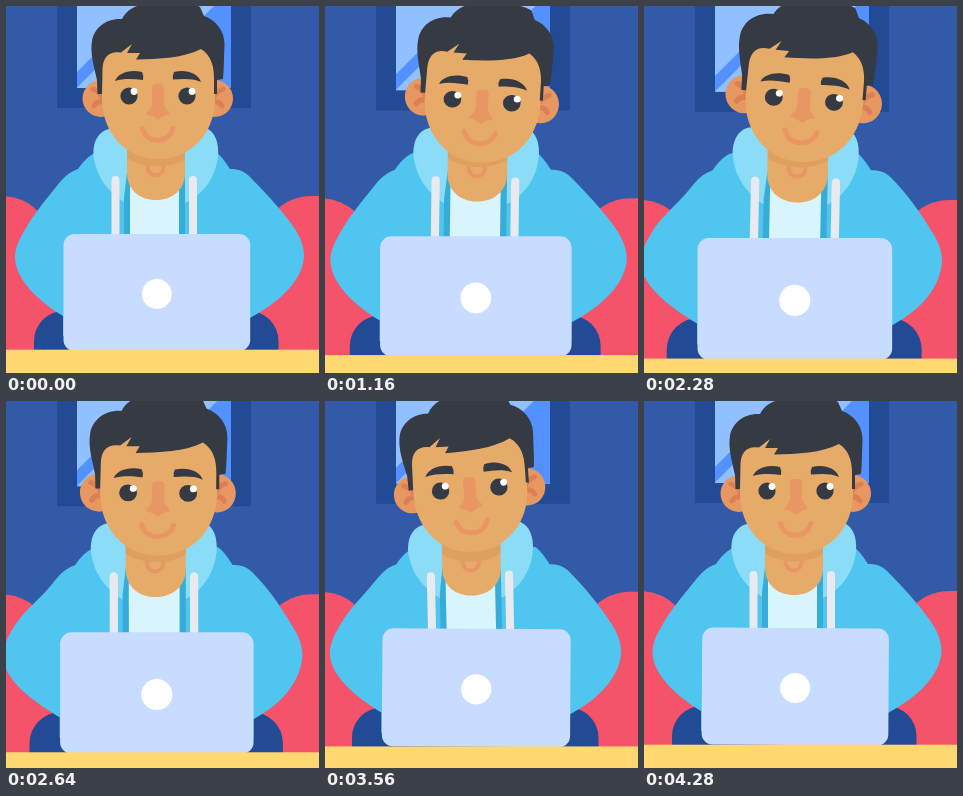
An HTML page with a canvas that plays this animation: 313x367 px, repeating every 4.32 s.

```html
<!DOCTYPE html>
<html lang="en">
<head>
<meta charset="utf-8">
<title>At the laptop</title>
<style>
html, body { margin: 0; width: 100%; height: 100%; overflow: hidden; background: #325aa8; }
canvas { display: block; width: 313px; height: 367px; }
</style>
</head>
<body>
<canvas id="stage"></canvas>
<script>
const W = 313, H = 367, LOOP = 4320, ZOOM = 4160;
const canvas = document.getElementById('stage');
const ctx = canvas.getContext('2d');
const ratio = window.devicePixelRatio || 1;
canvas.width = Math.round(W * ratio);
canvas.height = Math.round(H * ratio);

const C = {
  wall: '#325aa8', navy: '#234a94', glass: '#90c0ff', glassBlue: '#5291ff',
  couch: '#f45369', hoodie: '#4fc5ef', hood: '#8bdcf7', fold: '#35add8',
  shirt: '#d8f4fc', cord: '#e8eaf0', skin: '#e7ab69', shade: '#df9f60',
  ear: '#e79862', earIn: '#dd7f54', blush: '#e99665', hair: '#363a42',
  laptop: '#c7dcff', table: '#ffd871'
};

// Poses over time; every row of values shares these moments.
const times = [0, 520, 1160, 2280, 3000, 3560, 4280, 4320];
const pose = {
  headX: [152, 152.3, 157.2, 160, 144.3, 144.8, 152, 152],
  headY: [92, 93.5, 94, 92.5, 90.3, 89.3, 92, 92],
  tilt: [0, 1.4, 3.8, 4.8, -3.9, -3.9, 0, 0],
  nod: [0, 2.7, 3, 3, 2, 0.7, 0, 0],
  lean: [0, 0, 0.8, 1.2, -1.35, -1.2, 0, 0],
  elbow: [0, -4.8, 0, -6, -7.3, -3, -0.5, 0]
};

const rad = deg => deg * Math.PI / 180;
const ease = k => (1 - Math.cos(Math.PI * k)) / 2;
const ramp = (t, a, b) => ease(Math.min(1, Math.max(0, (t - a) / (b - a))));
const blink = t => ramp(t, 2840, 2940) * (1 - ramp(t, 2940, 3040));

function at(name, t) {
  const v = pose[name];
  let i = 0;
  while (i < times.length - 2 && t >= times[i + 1]) i++;
  return v[i] + (v[i + 1] - v[i]) * ramp(t, times[i], times[i + 1]);
}

function group(draw) {
  ctx.save();
  draw();
  ctx.restore();
}

function rect(x, y, w, h, color) {
  ctx.fillStyle = color;
  ctx.fillRect(x, y, w, h);
}

function round(x, y, w, h, r, color) {
  ctx.beginPath();
  ctx.roundRect(x, y, w, h, r);
  ctx.fillStyle = color;
  ctx.fill();
}

function oval(x, y, rx, ry, color) {
  ctx.beginPath();
  ctx.ellipse(x, y, rx, ry, 0, 0, 7);
  ctx.fillStyle = color;
  ctx.fill();
}

function shape(d, color) {
  ctx.fillStyle = color;
  ctx.fill(new Path2D(d));
}

function line(d, color, width) {
  ctx.strokeStyle = color;
  ctx.lineWidth = width;
  ctx.lineCap = ctx.lineJoin = 'round';
  ctx.stroke(new Path2D(d));
}

function turn(x, y, deg) {
  ctx.translate(x, y);
  ctx.rotate(rad(deg));
  ctx.translate(-x, -y);
}

function zoomAt(x, y, sx, sy) {
  ctx.translate(x, y);
  ctx.scale(sx, sy);
  ctx.translate(-x, -y);
}

function room() {
  rect(51, -20, 194, 122, C.navy);
  rect(71, -20, 154, 102, C.glass);
  group(() => {
    ctx.beginPath();
    ctx.rect(71, -20, 154, 102);
    ctx.clip();
    shape('M157 -20 H172.500 L70.500 82 H55 Z', C.glassBlue);
    shape('M228 -20 L126 82 H340 V-20 Z', C.glassBlue);
  });
  round(-60, 190, 106, 220, 50, C.couch);
  round(255, 190, 120, 220, 50, C.couch);
  rect(30, 250, 250, 150, C.couch);
}

function body(e) {
  shape(`M89 147 C82 150 76 157 72 163 C62 167 58 171 50 181
    C38 196 ${28 + e} 208 ${20 + e} 222 C${12 + e} 235 ${9 + e} 243 ${9 + e} 252
    C${10 + e} 275 34 296 57 310 V330 H244 V312
    C272 297 ${297 + e} 275 ${298 + e} 250 C${298 + e} 240 ${294 + e} 230 ${287 + e} 220
    C${274 + e * 0.6} 202 257 184 243 170 C237 164 231 163 224 163
    C219 155 215 150 210 146 Z`, C.hoodie);
}

function chest(zoom) {
  group(() => {
    zoomAt(84, 136, 1 - 0.03 * zoom, 1);
    shape(`M103 123 C90 126 86 140 88 153 C91 171 101 185 118 196 L124 198 V150 H176 V198
      L181 196 C199 187 210 170 212 150 C213 136 209 126 200 122 Z`, C.hood);
  });
  shape('M121 166 L118 192 V260 H179 V166 Z', C.fold);
  rect(124, 172, 49, 88, C.shirt);
  shape('M121 130 V167 C121 184 134 194 150 194 C166 194 179 184 179 167 V130 Z', C.skin);
  shape('M121 140 H179 V153 C164 163 136 163 121 152 Z', C.shade);
  line('M141.500 161 C142 172 157 172 157.500 161', C.blush, 4);
  line('M109.500 174 V250', C.cord, 8);
  line('M187 174 V250', C.cord, 8);
}

function ears() {
  oval(95, 92.500, 18.5, 18.5, C.ear);
  oval(209, 92.500, 18, 18.5, C.ear);
  line('M87 83 C93 85 97 90 97 94 M88 100 C90 96 93 95 97 96', C.earIn, 5);
  line('M217 83 C211 85 207 90 207 94 M216 100 C214 96 211 95 207 96', C.earIn, 5);
}

function hair() {
  shape(`M91.500 88 L91 74 C88 60 84 48 86 35 C88 22 100 12 116 13
    C120 5 128 0 136 -1 C148 -6 182 -6 194 1 L198 10
    C210 14 218.500 25 218.500 38 C218 50 218 62 217 73 L211 74 V88 H208 V72
    C208 62 206 50 195 43 C178 52 153 53 130 53.500 L134 47 L121 47 L126 38
    L115 46.500 C103 44.500 97 51 96.500 63 L96 88 Z`, C.hair);
}

function features(shut) {
  group(() => {
    ctx.translate(0, 4 * shut);
    shape('M109 75 C112 67 124 63 136 66 Q138 70 137 74 C128 73 118 72 109 75 Z', C.hair);
    shape('M195 76 C192 67 180 63 168 66 Q166 70 167 73.500 C176 73 186 72 195 76 Z', C.hair);
  });
  group(() => {
    zoomAt(152, 92, 1, 1 - 0.9 * shut);
    for (const x of [123, 181]) {
      oval(x, 90, 8.6, 8.6, C.hair);
      oval(x + 5, 85.5, 3.4, 3.4, '#fff');
    }
  });
  shape(`M146 82 Q146 78 150 78 H154 Q158 78 158 82 V98 Q159 102 163 106
    Q164 109 160 109 Q156 110 152 114 Q147 110 143 109 Q139 109 141 106 Q146 102 146 97 Z`, C.blush);
  line('M136.500 122.500 C140 138 163 138 167 122.500', C.blush, 5);
}

function head(t, scale) {
  const nod = at('nod', t);
  ctx.translate(at('headX', t), at('headY', t));
  ctx.rotate(rad(at('tilt', t)));
  ctx.scale(scale, scale);
  ctx.translate(-152, -92);
  ears();
  shape('M96 48 V94 C97 129 121 153 152 153 C184 153 208 129 209 94 V48 L190 36 H115 Z', C.skin);
  group(() => {
    ctx.translate(0, nod * 0.25);
    hair();
  });
  // Looking down brings brows and mouth closer together.
  ctx.translate(0, nod);
  zoomAt(152, 94, 1, 1 - 0.02 * nod);
  features(blink(t));
}

function laptop(t) {
  const lift = ramp(t, 3300, 3500) * (1 - ramp(t, 4280, LOOP));
  ctx.translate(0.4 * lift, -lift);
  turn(151, 288, 0.35 * lift);
  round(57.5, 228, 186.7, 117, 11, C.laptop);
  oval(150.8, 288, 15, 15, '#fff');
}

function draw(t) {
  const zoom = t < ZOOM ? ease(2 * t / ZOOM) : 0;
  const scale = 1 + 0.0435 * zoom;
  ctx.setTransform(ratio, 0, 0, ratio, 0, 0);
  rect(0, 0, W, H, C.wall);
  group(() => {
    ctx.translate(0, 4 * zoom);
    room();
  });

  const near = part => group(() => {
    zoomAt(151, 136, scale, scale);
    part();
  });
  near(() => {
    round(28, 305, 244.5, 70, 30, C.navy);
    body(at('elbow', t));
    turn(151, 330, at('lean', t));
    chest(zoom);
  });
  group(() => head(t, scale));
  near(() => laptop(t));
  rect(0, 343.7 + 9.1 * zoom, W, 40, C.table);
}

const start = performance.now();
function tick() {
  draw((performance.now() - start) % LOOP);
  requestAnimationFrame(tick);
}
tick();
</script>
</body>
</html>
```
